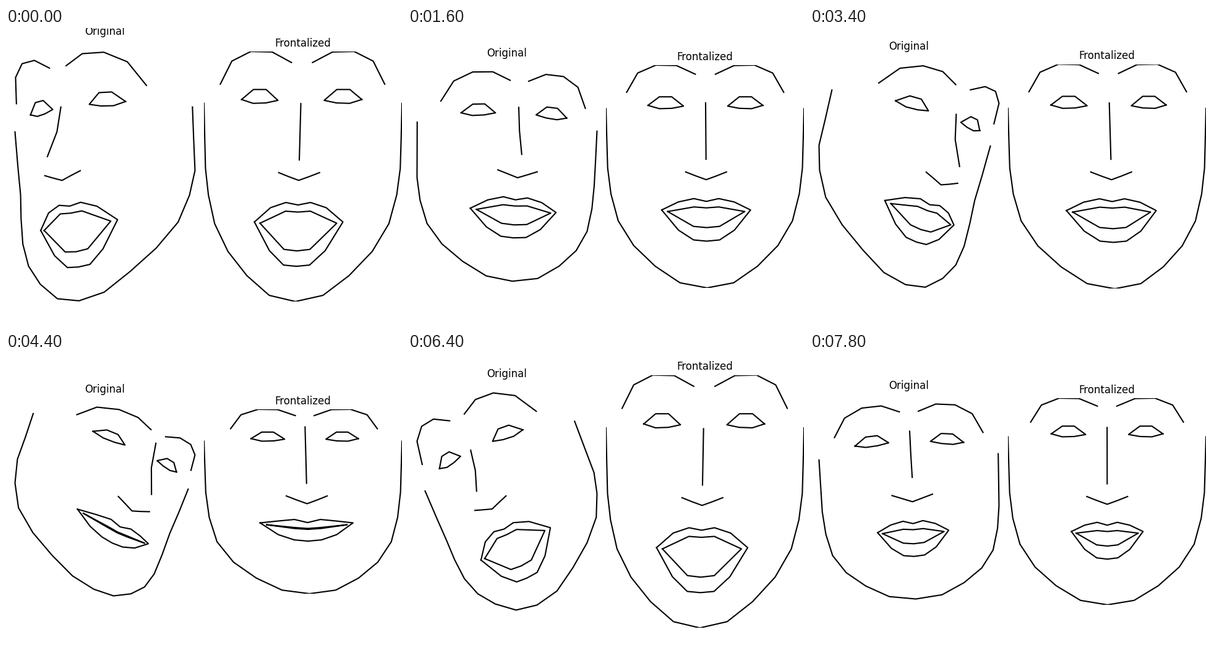
A matplotlib script for the animation above (8000 ms loop, 640x480 px).

```python
import numpy as np
import matplotlib.pyplot as plt
from matplotlib.animation import FuncAnimation

STEP = 200
FRAMES = 40
FLIP = np.array([-1, 1, 1])

# One half of the face at rest: x from the midline, y from the nose tip
JAW = np.array([(145, -105), (144, -61), (143, -18.5), (139, 22.5), (130, 63),
                (110, 98), (80, 126), (43, 147.5), (0, 154)])
BROW = np.array([(121, -127), (104, -152), (76, -162), (44.5, -161.5), (15.5, -150.5)])
EYE = np.array([(88.5, -109.5), (71, -121), (52, -121), (34, -108.5),
                (52, -105.5), (71, -105), (88.5, -109.5)])
BRIDGE = np.array([(0, -124), (0, -80), (0, -33)])
NOSTRIL = np.array([(33, -12.5), (16.5, -6), (0, 0)])
# Lips also carry how far they drop when the mouth is wide open
LIP_TOP = np.array([(71.5, 31, 37), (45, 28, 16.5), (20, 25.5, 10.5), (0, 30.5, 9.5)])
LIP_LOW = np.array([(45, 50, 65), (21, 58.5, 80), (0, 60.5, 80)])
GAP_TOP = np.array([(62, 34, 36), (20, 38.5, 11.5), (0, 40, 11.5)])
GAP_LOW = np.array([(21, 40, 73), (0, 41.5, 74)])

# Head turns in degrees and mouth width
TURN_MS = [0, 1000, 2400, 4400, 5600, 6400, 7800]
YAW = [-32, -10.7, 38, 30.5, -1, -21, 1.5]
PITCH = [14, 12, 10.5, 10.5, 11, 16, 13]
ROLL = [-8, -3.7, 13, 26, -5.5, -25, -2]
WIDTH = [1, 1.02, 0.98, 1.05, 0.98, 1.03, 0.81]
# Opening and closing of the jaw while speaking
TALK_MS = [0, 1000, 1800, 2400, 3000, 4400, 4900, 5600, 6400, 6600, 7200, 7800]
TALK = [0.98, 0, 0.58, -0.08, 0.7, -0.2, 0.4, 0.08, 1.03, 1.3, 0.38, 0.2]


def ease(ms, times, values):
    at = np.interp(ms, times, np.arange(len(times)))
    i = int(at)
    u = at - i
    return np.interp(i + u * u * (3 - 2 * u), np.arange(len(times)), values)


def solid(points, relief):
    """Wrap flat points round a cylinder-like head."""
    x = points[:, 0]
    return np.column_stack([points, relief * 166 * np.sqrt(1 - (x / 146) ** 2)])


def stretch(points, amount):
    x, y = points.T
    return np.column_stack([x, y + 0.0018 * amount * y * abs(y)])


def across(half):
    return np.vstack([half * FLIP, half[-2::-1]])


def lips(top, low, mouth, width):
    def half(rows):
        x, y, drop = rows.T
        return solid(np.column_stack([x * width, y + drop * mouth]), 0.93)
    ring = np.vstack([across(half(top)), across(half(low))[::-1]])
    return np.vstack([ring, ring[:1]])


def head(talk, width, jaw_gain, eye_gain=1):
    mouth = max(talk + 0.8 * (1 - width), 0)
    jaw = solid(stretch(JAW, talk), 1)
    jaw[:, 0] += jaw_gain * (jaw[:, 0] / 145) ** 3
    brow = solid(stretch(BROW, talk), 0.8) * [eye_gain, 1, 1]
    eye = solid(stretch(EYE, talk), 0.68) * [eye_gain, 1, 1]
    return [across(jaw), brow * FLIP, brow,
            solid(BRIDGE, np.array([0.84, 0.97, 1.2])), across(solid(NOSTRIL, 1)),
            eye * FLIP, eye,
            lips(LIP_TOP, LIP_LOW, mouth, width), lips(GAP_TOP, GAP_LOW, mouth, width)]


def turned(curve, yaw, pitch, roll):
    x, y, z = curve.T
    x = x * np.cos(yaw) + z * np.sin(yaw)
    y = y * np.cos(pitch) - z * np.sin(pitch)
    return np.array([x * np.cos(roll) - y * np.sin(roll),
                     x * np.sin(roll) + y * np.cos(roll)])


def fronted(curve, yaw):
    x, y, _ = curve.T
    lean = 26 * np.sin(yaw) * (0.5 + y / 500)
    return np.array([x + lean * (1 - (x / 160) ** 2), y])


def limits(values, margin):
    lo, hi = values.min(), values.max()
    pad = (hi - lo) * margin
    return lo - pad, hi + pad


def show(ax, curves, margin):
    for line, curve in zip(ax.lines, curves):
        line.set_data(curve)
    x, y = np.hstack(curves)
    ax.set_xlim(limits(x, margin))
    ax.set_ylim(limits(y, margin)[::-1])


fig, (left, right) = plt.subplots(1, 2, figsize=(6.4, 4.8), dpi=100,
                                  gridspec_kw=dict(left=0, right=1, bottom=0, top=1, wspace=0))
for ax, title in (left, "Original"), (right, "Frontalized"):
    ax.axis("off")
    ax.set_aspect("equal")
    ax.set_title(title, fontsize=12)
    for _ in range(9):
        ax.plot([], [], color="black", lw=1.5)


def update(i):
    ms = i * STEP
    yaw, pitch, roll = (np.radians(ease(ms, TURN_MS, v)) for v in (YAW, PITCH, ROLL))
    width = ease(ms, TURN_MS, WIDTH)
    talk = ease(ms, TALK_MS, TALK)
    posed = head(talk, width, 38 * abs(np.sin(yaw)))
    flat = head(talk, width, 15, 1 + 0.1 * talk)
    show(left, [turned(c, yaw, pitch, roll) for c in posed], 0.05)
    show(right, [fronted(c, yaw) for c in flat], 0)


anim = FuncAnimation(fig, update, frames=FRAMES, interval=STEP, repeat=True, repeat_delay=0)
plt.show()
```
